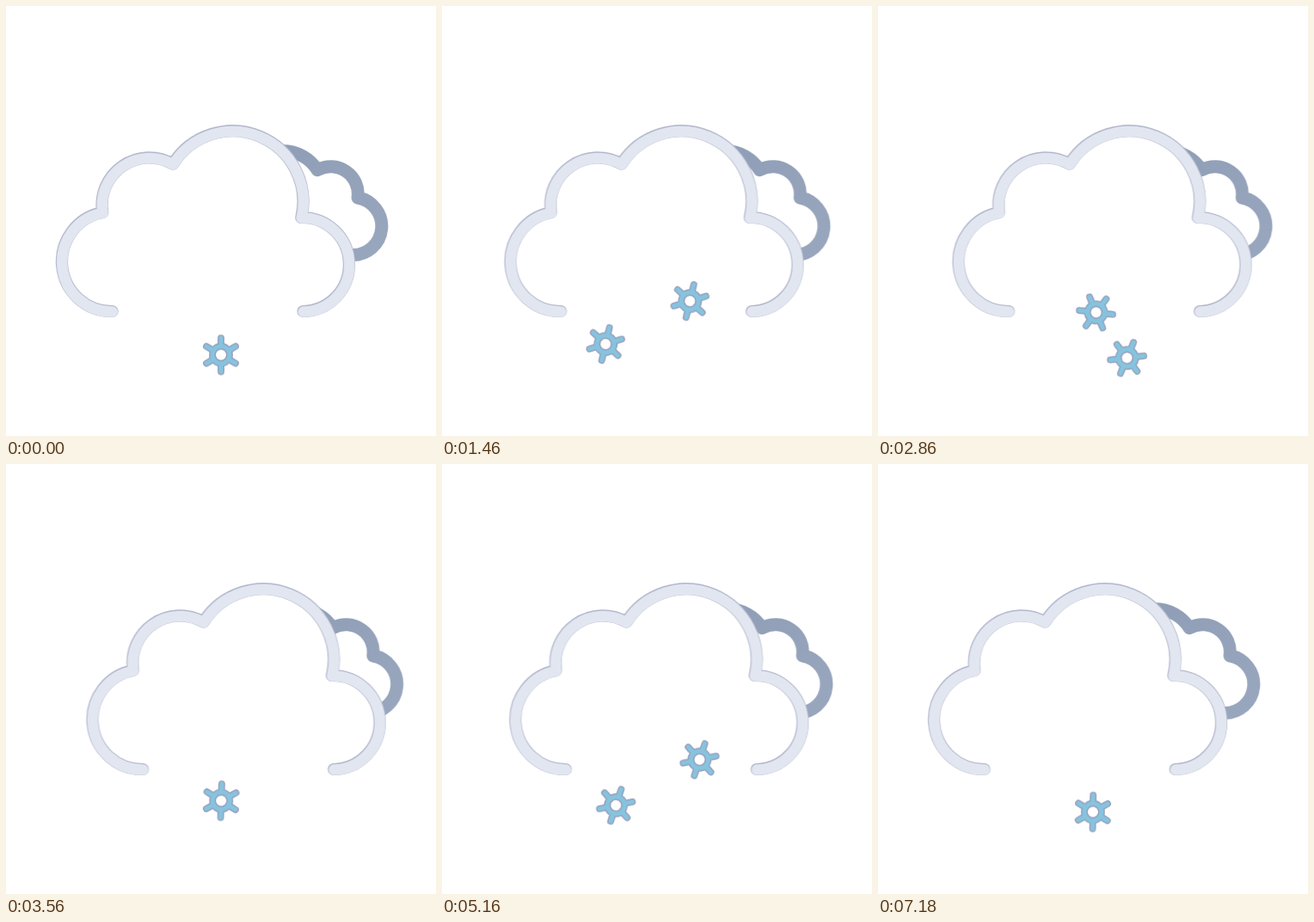
An HTML page for the animation above (7.2 s loop, 500x500 px).

```html
<!DOCTYPE html>
<html lang="en">
<head>
<meta charset="utf-8">
<title>Snow cloud</title>
<style>
  html, body { margin: 0; width: 100%; height: 100%; overflow: hidden; background: #fff; }
  svg { display: block; width: 100vw; height: 100vh; }
  path { stroke-linecap: round; stroke-linejoin: round; }

  .drift { animation: drift 3.6s linear infinite alternate; }
  .fall { animation: fall 3.6s linear infinite, show 3.6s step-end infinite; animation-delay: var(--at); }
  .spin { animation: spin 7.2s linear infinite; }
  .ccw { animation-direction: reverse; }

  @keyframes drift { to { transform: translateX(var(--dx)); } }
  @keyframes fall {
    from { transform: translate(var(--x), 318.5px); }
    to { transform: translate(var(--x), 506px); }
  }
  @keyframes show { 0% { opacity: 1; } 62.2%, 100% { opacity: 0; } }
  @keyframes spin { to { transform: rotate(360deg); } }
</style>
</head>
<body>
<svg viewBox="0 0 500 500">
  <defs>
    <linearGradient id="slate" gradientUnits="userSpaceOnUse" x1="340" y1="165" x2="420" y2="297">
      <stop offset="0" stop-color="#909fb7"/>
      <stop offset="1" stop-color="#99a7be"/>
    </linearGradient>
    <path id="cloud" d="M123.5 355A58 58 0 0 1 112.2 240A55 55 0 0 1 194 183.7A82 82 0 0 1 343.3 246A54.5 54.5 0 1 1 345.5 355"/>
    <g id="star" fill="none">
      <circle r="10"/>
      <path d="M0-10V-19.6M0 10V19.6M8.66-5L16.97-9.8M-8.66 5L-16.97 9.8M8.66 5L16.97 9.8M-8.66-5L-16.97-9.8"/>
    </g>
    <g id="flake">
      <use href="#star" stroke="#959bb8" stroke-width="7.8"/>
      <use href="#star" stroke="#86c3de" stroke-width="5.2"/>
    </g>
  </defs>

  <g class="drift" style="--dx:18px">
    <path d="M322 168.5A47.8 47.8 0 0 1 362 190.8A31.8 31.8 0 0 1 409 223A33.5 33.5 0 0 1 402.5 289.5"
          fill="none" stroke="url(#slate)" stroke-width="15"/>
  </g>

  <g class="drift" style="--dx:36px">
    <use href="#cloud" fill="#fff" stroke="#b2b7ce" stroke-width="14.2"/>
    <use href="#cloud" fill="none" stroke="#e2e6f0" stroke-width="12.5" transform="translate(.3 .6)"/>
  </g>

  <!-- Each flake sits about 6 units below its pivot, so it sways as it turns. -->
  <g class="fall" style="--x:196.2px;--at:-3.552s"><g class="spin"><use href="#flake" x="-.8" y="6"/></g></g>
  <g class="fall" style="--x:250px;--at:-1.557s"><g class="spin ccw"><use href="#flake" y="6"/></g></g>
  <g class="fall" style="--x:293.8px;--at:-2.563s"><g class="spin"><use href="#flake" x=".8" y="6"/></g></g>
</svg>
</body>
</html>
```
